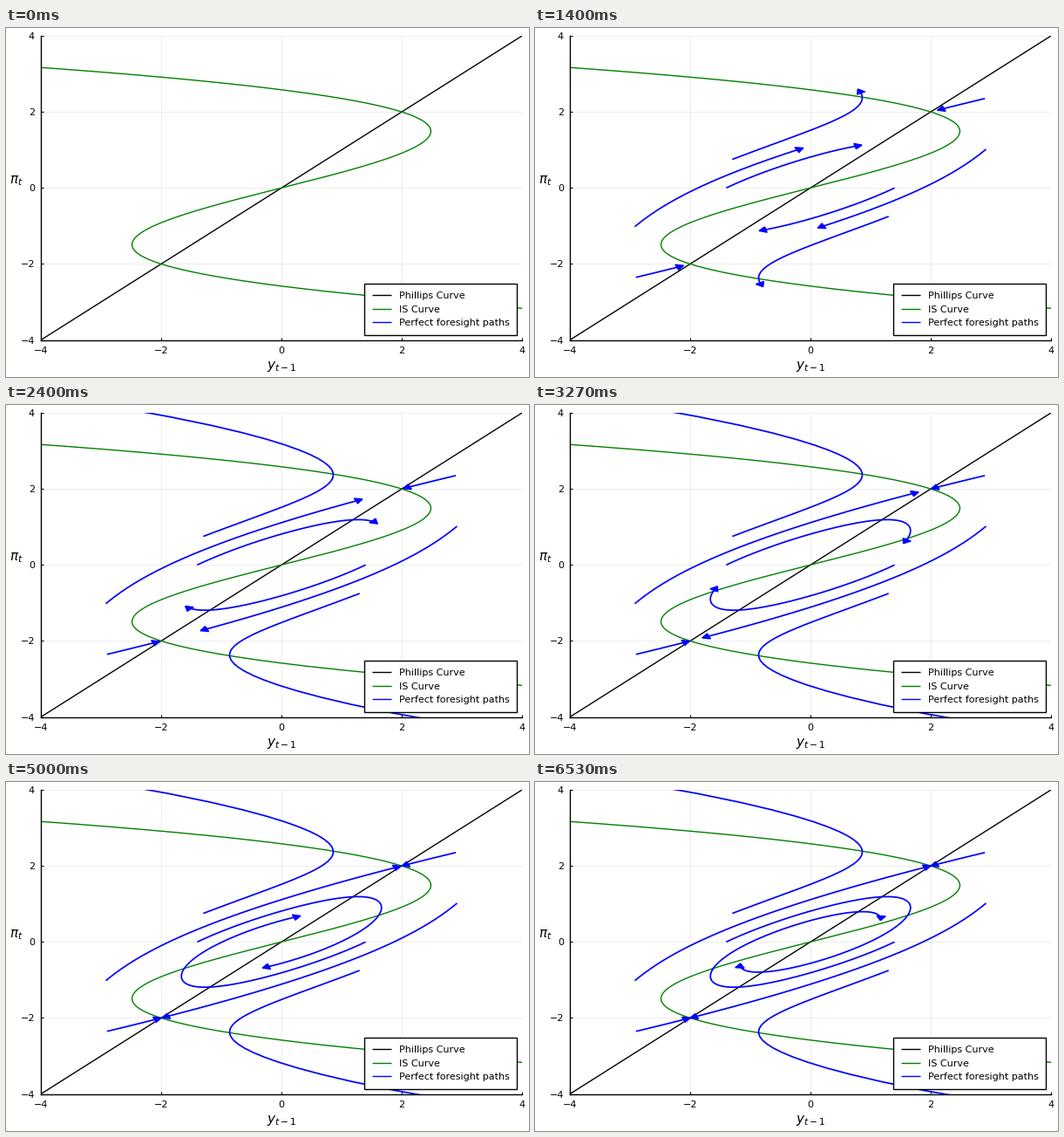
A matplotlib script for the animation above (6590 ms loop, 600x400 px).

```python
import numpy as np
import matplotlib.pyplot as plt
from matplotlib.animation import FuncAnimation
from matplotlib.patches import Rectangle
from matplotlib.transforms import Affine2D

W, H, DPI = 600, 400, 100
FRAMES, LOOP_MS = 99, 6590
LEFT, RIGHT, TOP, BOTTOM = 40, 592, 9, 357.6

# Model: Phillips curve slope and discount, inertia, IS slope, cubic Taylor rule
BETA, KAPPA, ETA, SIGMA, PHI, ALPHA = 0.95, 0.05, 0.95, 0.25, 0.5, 0.075


def rate(p):
    return PHI * p + ALPHA * p**3


def next_pi(p, y):
    return (p - KAPPA * y) / BETA


def next_y(y, p):
    """Output implied by lagged output y and current inflation p."""
    return (ETA * y - SIGMA * rate(p) + SIGMA * p / BETA) / (1 + SIGMA * KAPPA / BETA)


def path(y, p, steps=FRAMES):
    """Perfect foresight path whose first plotted point is (y, p)."""
    lag = y
    for _ in range(40):
        p1 = next_pi(p, lag)
        lag = (y + SIGMA * (rate(p1) - next_pi(p1, y))) / ETA
    pts = [(y, p)]
    p = next_pi(p, lag)
    while len(pts) < steps:
        p1 = next_pi(p, y)
        y = next_y(y, p1)
        pts.append((y, p))
        if abs(p) > 6:
            break
        p = p1
    return np.array(pts)


def saddle_path(y, low, high):
    """Shoot for the start that converges to the steady state (2, 2)."""
    for _ in range(60):
        mid = (low + high) / 2
        if path(y, mid, 150)[-1, 1] > 2:
            high = mid
        else:
            low = mid
    return path(y, (low + high) / 2)


half = [
    path(-1.4, 0.0),
    path(-1.3, 0.75),
    saddle_path(-2.92, -1.3, -0.8),
    saddle_path(2.9, 2.1, 2.6),
]
paths = half + [-q for q in half]

plt.rcParams.update({"font.family": "DejaVu Sans", "font.size": 8,
                     "mathtext.fontset": "dejavusans",
                     "lines.solid_capstyle": "butt"})
fig = plt.figure(figsize=(W / DPI, H / DPI), dpi=DPI, facecolor="white")
ax = fig.add_axes([LEFT / W, 1 - BOTTOM / H, (RIGHT - LEFT) / W, (BOTTOM - TOP) / H])
ax.set(xlim=(-4, 4), ylim=(-4, 4))
ticks = np.arange(-4, 5, 2)
ax.set_xticks(ticks)
ax.set_yticks(ticks)
ax.tick_params(direction="in", length=2.5, width=0.8, pad=5)
ax.grid(color="black", alpha=0.1, lw=0.5)
ax.set_axisbelow(True)
ax.spines[["top", "right"]].set_visible(False)
ax.spines[["left", "bottom"]].set_linewidth(1)

pi = np.linspace(-4, 4, 600)
ax.plot([-4, 4], [-4, 4], color="black", lw=1)
ax.plot(SIGMA / (1 - ETA) * (pi - rate(pi)), pi, color="green", lw=1)

trails = [ax.plot([], [], color="blue", lw=1.25, zorder=3)[0] for _ in paths]
heads = [ax.fill([0], [0], fc="blue", ec="blue", lw=1, joinstyle="miter", zorder=4)[0]
         for _ in paths]

# Labels and legend in pixels from the top left corner
px = Affine2D().scale(1, -1).translate(0, H) + Affine2D().scale(1 / W, 1 / H) + fig.transFigure


def label(x, y, text, **kw):
    ax.text(x, y, text, transform=px, zorder=8, **kw)


label(316, 388, "$y_{t-1}$", size=11, ha="center", va="center")
label(12, 175.5, r"$\pi_t$", size=11, ha="center", va="center")

ax.add_patch(Rectangle((411, 293), 175, 59, transform=px, fc="white", ec="black",
                       lw=1, zorder=6))
legend = [("Phillips Curve", "black"), ("IS Curve", "green"),
          ("Perfect foresight paths", "blue")]
for i, (name, color) in enumerate(legend):
    y = 306 + 15.5 * i
    ax.plot([420, 442], [y, y], transform=px, color=color, lw=1, zorder=7,
            scalex=False, scaley=False)
    label(451, y + 4, name, va="baseline")


def arrow(a, b, length=0.118, width=0.075):
    d = (b - a) / np.hypot(*(b - a))
    n = np.array([-d[1], d[0]])
    base = b - length * d
    return [b, base + width * n, base - width * n]


def update(k):
    for q, trail, head in zip(paths, trails, heads):
        seg = q[:k + 1]
        moving = len(seg) > 1
        trail.set_data(*seg.T)
        trail.set_visible(moving)
        head.set_visible(moving)
        if moving:
            head.set_xy(arrow(seg[-2], seg[-1]))
    return trails + heads


anim = FuncAnimation(fig, update, frames=FRAMES, interval=LOOP_MS / FRAMES,
                     repeat=True, repeat_delay=0, blit=False)
plt.show()
```
